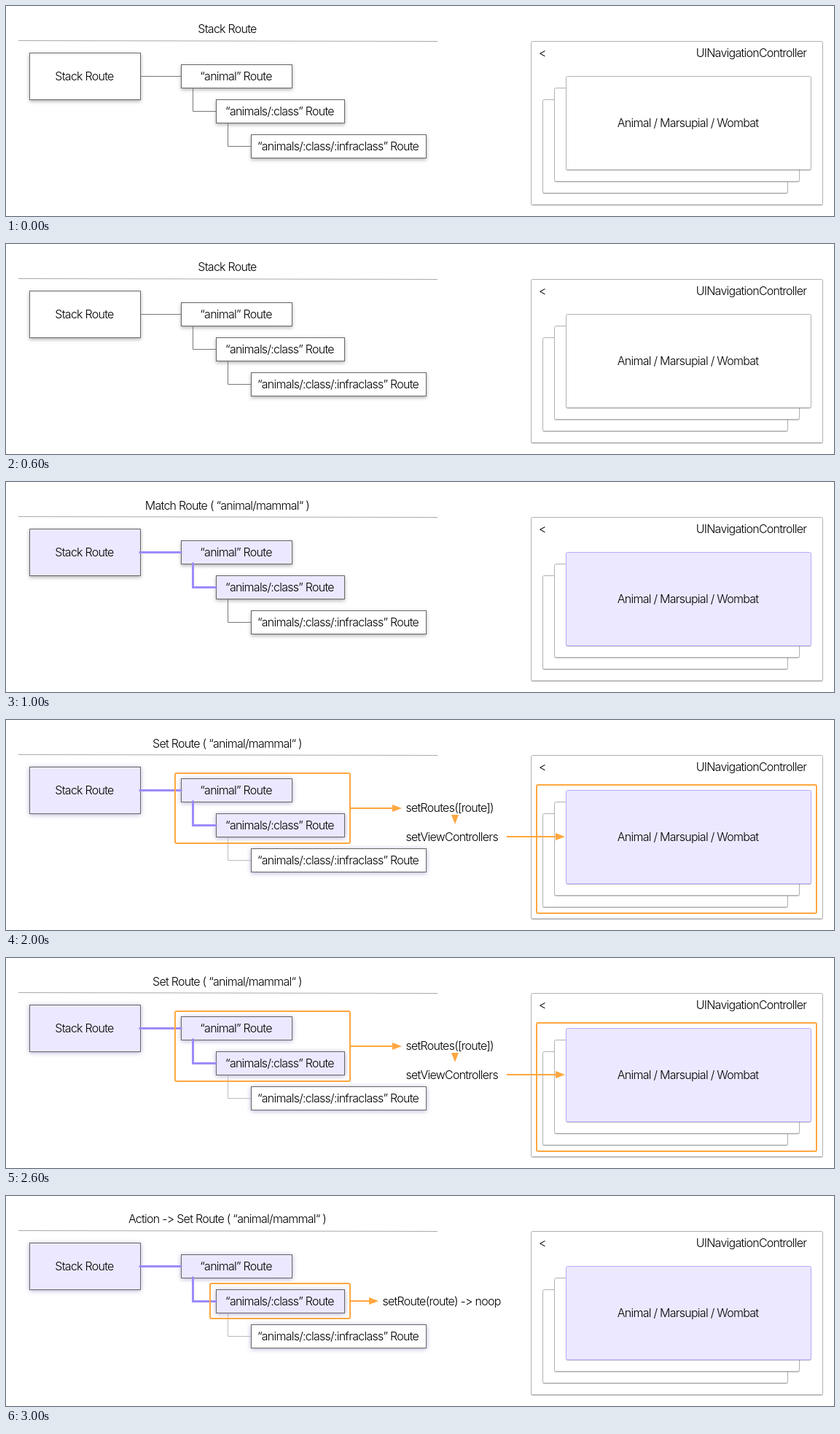
An HTML page for the animation above (4 s loop, 1136x288 px).

```html
<!DOCTYPE html>
<html lang="en">
<head>
<meta charset="utf-8">
<title>Stack Route</title>
<style>
html, body { margin: 0; width: 100%; height: 100%; overflow: hidden; background: #fff; }
svg { display: block; }
text { font: 300 16px Inter, "Open Sans", sans-serif; letter-spacing: -.74px; fill: #000; }
.mid { text-anchor: middle; }
.rule { stroke: #aaa; }
.node { fill: #fff; stroke: #666; filter: drop-shadow(0 2px 2.5px rgba(0, 0, 0, .3)); }
.card { fill: #fff; stroke: #b0b0b0; filter: drop-shadow(0 1px 0 rgba(0, 0, 0, .2)); }
.link { fill: none; stroke: #777; }
.on .node.hit { fill: #ece8ff; }
.on .card.hit { fill: #ece8ff; stroke: #b5a9ff; }
.on .link.hit { stroke: #9b8cfa; stroke-width: 3; stroke-linecap: square; }
.soft .node { filter: drop-shadow(0 1px 3px rgba(70, 50, 150, .4)); }
.soft .link:not(.hit) { stroke: #bbb; }
.frame, .arrow { fill: none; stroke: #ffa740; stroke-width: 2; }
.head { fill: #ffa740; }
</style>
</head>
<body>
<svg id="stage" width="1136" height="288" viewBox="0 0 1136 288"></svg>
<script>
const stage = document.getElementById('stage');
const LOOP = 4000, STEP = 1000;

const label = (x, y, s, cls = '') => `<text x="${x}" y="${y}" class="${cls}">${s}</text>`;
const mid = (x, y, s) => label(x, y, s, 'mid');
const title = (y, s) => mid(303.5, y, s);
const rect = (cls, x, y, w, h, r = 0) =>
  `<rect class="${cls}" x="${x}" y="${y}" width="${w}" height="${h}" rx="${r}"/>`;
const path = (cls, d) => `<path class="${cls}" d="${d}"/>`;
const node = (cls, x, y, w, h, s) =>
  rect('node ' + cls, x + .5, y + .5, w, h) + mid(x + w / 2 - .5, y + h / 2 + 6, s);
const card = (cls, x, y, w, h) => rect('card ' + cls, x + .5, y + .5, w, h, 2);
const frame = (x, y, w, h) => rect('frame', x, y, w, h, 2);
const arrow = (x1, x2, y) =>
  path('arrow', `M${x1} ${y}H${x2 - 11}`) + path('head', `M${x2} ${y}l-13 -5v10z`);

const base =
  path('rule', 'M17 47.5L592 48.5') +
  node('hit', 32, 64, 152, 64, 'Stack Route') +
  node('hit', 240, 80, 152, 32, '“animal” Route') +
  node('hit', 288, 128, 176, 32, '“animals/:class” Route') +
  node('', 336, 176, 240, 32, '“animals/:class/:infraclass” Route') +
  path('link', 'M304.5 161V192.5H336') +
  path('link hit', 'M184 96.5H240') +
  path('link hit', 'M256.5 112V144.5H288') +
  card('', 720, 48, 400, 224) +
  label(731, 70, '&lt;') +
  mid(1022.5, 70, 'UINavigationController') +
  card('', 736, 128, 336, 128) +
  card('', 752, 112, 336, 128) +
  card('hit', 768, 96, 336, 128) +
  mid(935.5, 166, 'Animal / Marsupial / Wombat');

const call = '( “animal/mammal“ )';
const scenes = [
  ['', title(37, 'Stack Route')],
  ['on', title(38, 'Match Route ' + call)],
  ['on soft', title(38, 'Set Route ' + call) +
    frame(232, 73, 240, 96) +
    frame(728, 89, 384, 176) +
    arrow(473, 543, 121) +
    label(548.5, 126, 'setRoutes([route])') +
    path('head', 'M616 143l-5 -13h10z') +
    label(548.5, 166, 'setViewControllers') +
    arrow(687, 767, 160)],
  ['on soft', title(37, 'Action -&gt; Set Route ' + call) +
    frame(280, 120, 192, 48) +
    arrow(473, 511, 144) +
    label(516.5, 150, 'setRoute(route) -&gt; noop')]
];

let shown = -1;
const start = performance.now();
function draw() {
  const i = Math.floor((performance.now() - start) % LOOP / STEP);
  if (i !== shown) {
    shown = i;
    const [state, extra] = scenes[i];
    stage.setAttribute('class', state);
    stage.innerHTML = base + extra;
  }
  requestAnimationFrame(draw);
}
draw();
</script>
</body>
</html>
```
